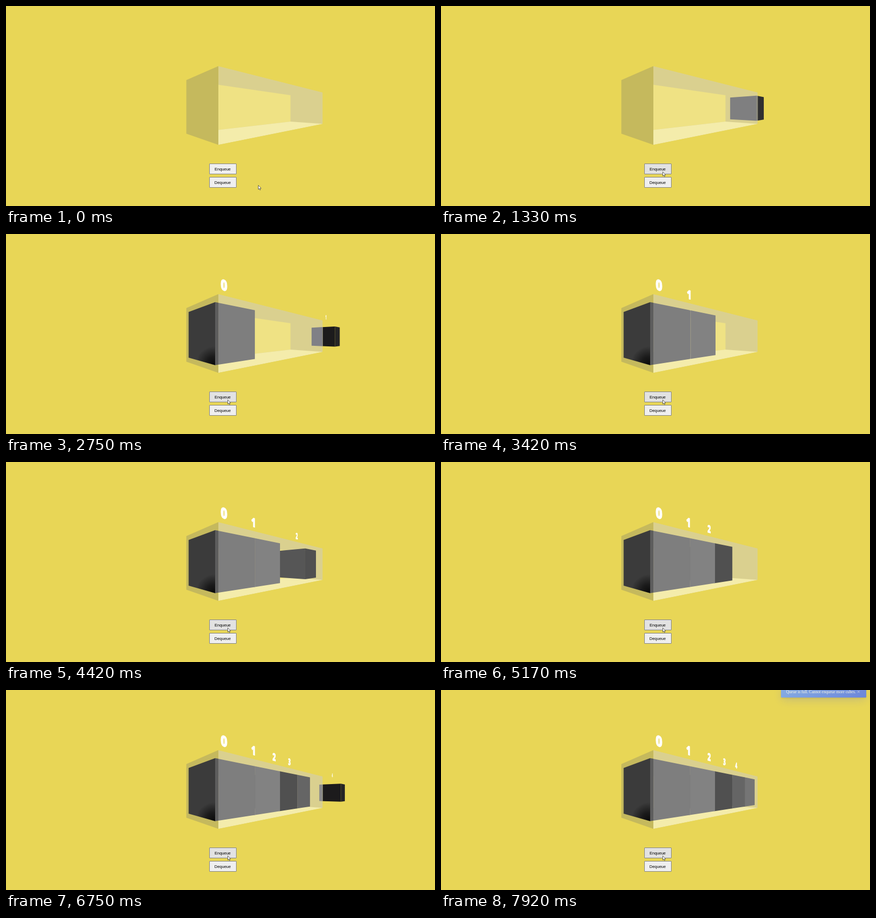
Animation, 800 px wide and 372 px high, one loop 8 s. Source, as an HTML page with a canvas:

```html
<!DOCTYPE html>
<html lang="en">
<head>
<meta charset="utf-8">
<title>Queue</title>
<style>
  html, body { margin: 0; width: 100%; height: 100%; overflow: hidden; background: #e8d656; }
  canvas { position: absolute; left: 0; top: 0; }
  .button {
    position: absolute; left: 378.5px; width: 51px; height: 20.5px; box-sizing: border-box;
    border: .6px solid #858585; border-radius: 1px; background: #efefef; color: #000;
    font: 7.5px/19px "Liberation Sans", Arial, sans-serif; text-align: center;
  }
  #enqueue { top: 292.5px; }
  #dequeue { top: 317.5px; }
  #toast {
    position: absolute; left: 634px; width: 159px; height: 20px; box-sizing: border-box;
    padding-left: 9.6px; border-radius: 1px; color: #fff; white-space: nowrap;
    font: 7.55px/20px "Liberation Serif", Times, serif;
    background: linear-gradient(135deg, #73a5ff, #5477f5);
    box-shadow: 0 1.5px 3px -.5px #0000001f, 0 5px 17px -2px #4d60e84d;
  }
  #toast span { opacity: .5; margin-left: 2px; font-family: "DejaVu Sans", sans-serif; }
</style>
</head>
<body>
<div class="button" id="enqueue">Enqueue</div>
<div class="button" id="dequeue">Dequeue</div>
<div id="toast">Queue is full. Cannot enqueue more cubes.<span>✕</span></div>
<canvas id="scene" width="800" height="372"></canvas>
<script>
const LOOP = 8000, SLIDE = 900, ENTRY = 10, FOCAL = 246.8, HORIZON = 193.3;
const TOAST_START = 7740, FIRST_LABEL = 1500;
const CUBES = [
  { start: 1156, left: '#7f7f80', front: '#7e7e7e' },
  { start: 2649, left: '#808086', front: '#828282' },
  { start: 4046, left: '#565656', front: '#505050' },
  { start: 5446, left: '#7c7c7c', front: '#656565' },
  { start: 6672, left: '#8a8a8a', front: '#757575' }
];
const CLICKS = [...CUBES.map(c => c.start), TOAST_START];
const ctx = document.getElementById('scene').getContext('2d');
const enqueue = document.getElementById('enqueue');
const toast = document.getElementById('toast');
const arrow = new Path2D('M0 0V7.6L1.8 6 3 8.8 4.2 8.3 3 5.6H5.4Z');

const clamp = v => Math.min(1, Math.max(0, v));
const cubicOut = p => 1 - (1 - clamp(p)) ** 3;
const smooth = p => (p = clamp(p)) * p * (3 - 2 * p);

// World axes: s along the queue, y up, t away from the viewer.
function project([s, y, t]) {
  const x = -.0853 + .791 * s - .612 * t, z = 2.105 + .612 * s + .791 * t;
  return [400 + FOCAL * x / z, HORIZON - FOCAL * (y + .068) / z];
}

function shape(...points) {
  const path = new Path2D();
  points.forEach(p => path.lineTo(...project(p)));
  path.closePath();
  return path;
}
const sideFace = (s, h, t0, t1) => shape([s, h, t0], [s, h, t1], [s, -h, t1], [s, -h, t0]);
const longFace = (s0, s1, h, t) => shape([s0, h, t], [s1, h, t], [s1, -h, t], [s0, -h, t]);

function fill(path, color) {
  ctx.fillStyle = color;
  ctx.fill(path);
}

function clipped(region, draw) {
  ctx.save();
  ctx.clip(region, 'evenodd');
  draw();
  ctx.restore();
}

const A = -.01, B = 4.99, H = .6, NEAR = -.1, FAR = 1.1;
const leftGlass = sideFace(A, H, NEAR, FAR);
const frontGlass = longFace(A, B, H, NEAR);
const backWall = longFace(A, B, H, FAR);
const floor = shape([A, -H, NEAR], [B, -H, NEAR], [B, -H, FAR], [A, -H, FAR]);
const outside = new Path2D();
outside.rect(0, 0, 800, 372);
outside.addPath(leftGlass);
outside.addPath(frontGlass);

const shadow = ctx.createRadialGradient(388, 243, 2, 388, 243, 34);
shadow.addColorStop(0, '#0c0c0c');
shadow.addColorStop(.4, '#1a1a1a');
shadow.addColorStop(1, '#3b3b3b');

function drawBox() {
  fill(leftGlass, '#c5b95d');
  clipped(frontGlass, () => {
    fill(frontGlass, '#dad08f');
    fill(backWall, '#efe284');
    fill(floor, '#f4ecab');
  });
}

function drawCube(cube, s) {
  const left = sideFace(s, .5, 0, 1), front = longFace(s, s + 1, .5, 0);
  const paint = (region, leftColor, frontColor) => clipped(region, () => {
    fill(left, leftColor);
    fill(front, frontColor);
  });
  paint(outside, '#1c1b1c', s < 5.6 ? '#303030' : '#252525');
  paint(frontGlass, cube.left, cube.front);
  paint(leftGlass, shadow, '#5d5d5d');
}

function drawLabel(text, s) {
  const at = (ds, dy) => project([s + .59 + ds, .955 + dy, .5]);
  const [x, y] = at(0, 0), [x1, y1] = at(.05, 0), [x0, y0] = at(-.05, 0);
  ctx.save();
  ctx.setTransform((x1 - x0) / 10, (y1 - y0) / 10, 0, (y - at(0, 1)[1]) / 100, x, y);
  ctx.font = '800 32px "Open Sans", sans-serif';
  ctx.textAlign = 'center';
  ctx.fillStyle = ctx.strokeStyle = '#fff';
  ctx.lineWidth = 1.5;
  ctx.fillText(text, 0, 0);
  ctx.strokeText(text, 0, 0);
  ctx.restore();
}

function drawCursor(time) {
  const p = smooth((time - 60) / 770), x = 470.5 - 57 * p, y = 333.5 - 25 * p;
  const pressed = CLICKS.some(c => time >= c - 100 && time < c);
  const hover = x < 429 && y < 313;
  enqueue.style.background = pressed ? '#f5f5f5' : hover ? '#e2e2e2' : '#efefef';
  ctx.save();
  ctx.translate(x, y);
  fill(arrow, '#fff');
  ctx.strokeStyle = '#333';
  ctx.lineWidth = .7;
  ctx.stroke(arrow);
  ctx.restore();
}

function render(now) {
  const time = now % LOOP;
  ctx.clearRect(0, 0, 800, 372);
  drawBox();
  const position = i => ENTRY + (i - ENTRY) * cubicOut((time - CUBES[i].start) / SLIDE);
  for (let i = CUBES.length - 1; i >= 0; i--) {
    if (time >= CUBES[i].start) drawCube(CUBES[i], position(i));
  }
  CUBES.forEach((cube, i) => {
    if (time >= Math.max(cube.start, FIRST_LABEL)) drawLabel(i, position(i));
  });
  drawCursor(time);

  const shown = cubicOut((time - TOAST_START) / 400);
  toast.style.top = -70 + 77 * shown + 'px';
  toast.style.opacity = shown;
  requestAnimationFrame(render);
}
requestAnimationFrame(render);
</script>
</body>
</html>
```
